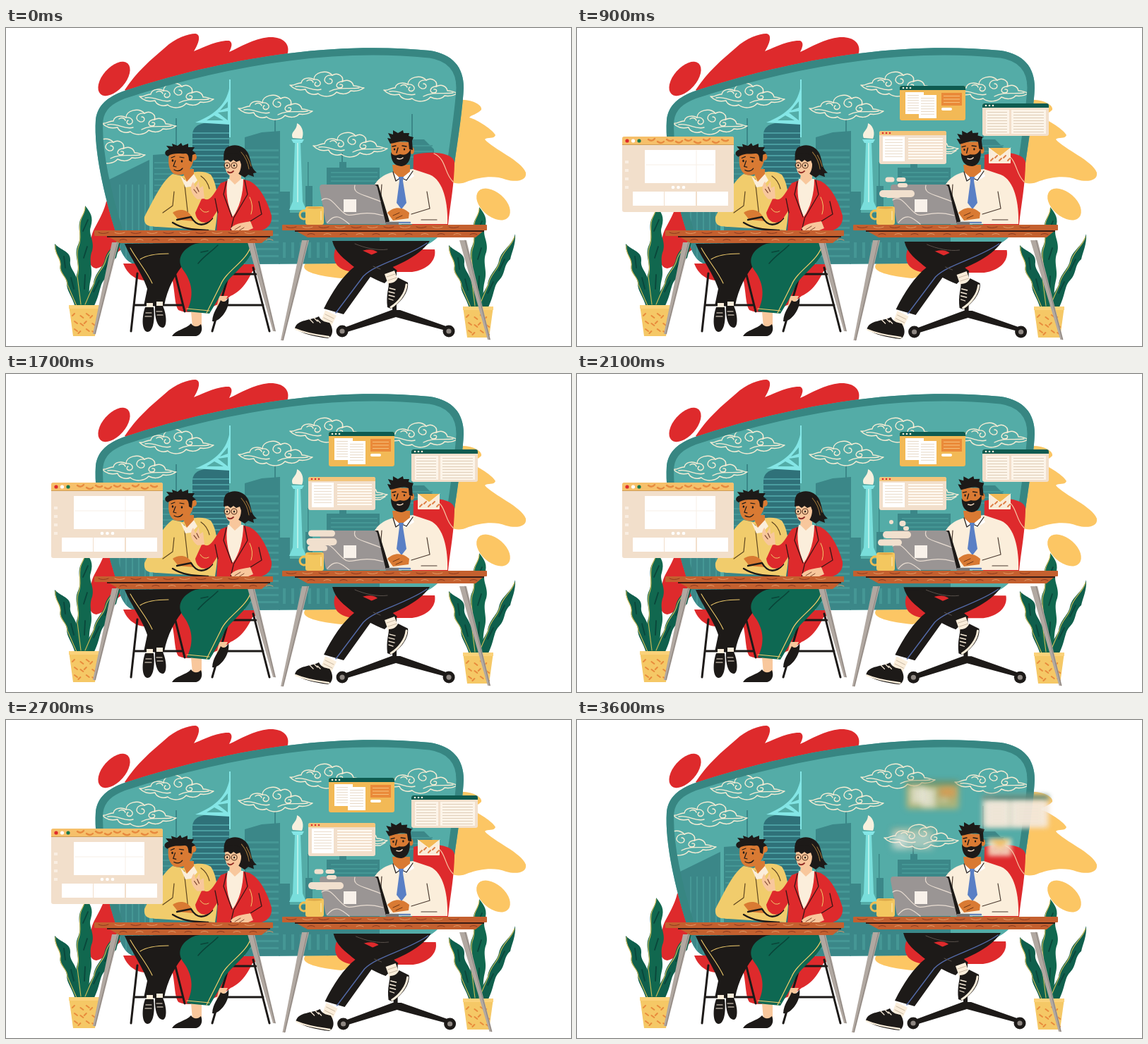
An HTML page with a canvas for the animation above (3700 ms loop, 800 by 451 pixels).

```html
<!DOCTYPE html>
<html lang="en">
<head>
<meta charset="utf-8">
<title>Team at work</title>
<style>
html, body { margin: 0; width: 100%; height: 100%; overflow: hidden; background: #fff; }
canvas { display: block; width: 800px; height: 451px; }
</style>
</head>
<body>
<canvas id="stage" width="800" height="451"></canvas>
<script>
const ctx = document.getElementById('stage').getContext('2d');
const LOOP = 3700, STEP = 100, SWAY = 1800;
const RED = '#de2a2c', YELLOW = '#fcc664', INK = '#1d1a18', CREAM = '#fbeedb', PAPER = '#f2dfcb',
      SKY = '#54aca7', RIM = '#378682', TAN = '#d97a33', PINK = '#f8c79c', GREEN = '#0e6852', GOLD = '#f1cc6c',
      WOOD = '#c4602f', STEEL = '#b1a8a1', CYAN = '#84e6e6', WHITE = '#fff';

function fill(d, c) { ctx.fillStyle = c; ctx.fill(new Path2D(d)); }
function line(d, c, w = 1.3) {
  ctx.strokeStyle = c; ctx.lineWidth = w;
  ctx.stroke(new Path2D(d));
}
function box(x, y, w, h, c, r = 0) {
  ctx.fillStyle = c; ctx.beginPath(); ctx.roundRect(x, y, w, h, r); ctx.fill();
}
function oval(x, y, rx, ry, c, a = 0) {
  ctx.fillStyle = c; ctx.beginPath(); ctx.ellipse(x, y, rx, ry, a, 0, 7); ctx.fill();
}
function stripes(x, y, w, n, gap, c, h = 1) {
  for (let i = 0; i < n; i++) box(x, y + i * gap, w, h, c);
}
function at(x, y, draw, angle = 0, s = 1) {
  ctx.save(); ctx.translate(x, y); ctx.rotate(angle); ctx.scale(s, s); draw(); ctx.restore();
}
function turn(x, y, angle, draw) {
  at(x, y, () => { ctx.translate(-x, -y); draw(); }, angle);
}

function splashes() {
  oval(153, 72, 29, 16, RED, -0.85);
  fill('M168 88C185 62 205 45 225 28C240 14 258 8 268 8C277 9 273 22 266 33C278 28 300 17 316 18C322 21 319 28 316 34C332 27 350 15 372 13C392 12 402 22 399 35L390 60L200 120Z', RED);
  fill('M142 246C136 272 119 287 121 302C113 318 116 340 128 341C146 337 152 318 168 312L200 300L170 250Z', RED);
  fill('M225 325H357C346 355 336 372 318 380C300 396 262 409 244 400C236 388 242 360 225 325Z', RED);
  fill('M646 102C662 102 675 110 673 116C668 122 657 124 656 127C668 130 690 145 693 152C691 158 682 154 678 158C690 172 730 188 736 205C738 217 722 219 708 215C690 208 670 212 655 217C645 222 636 221 630 218Z', YELLOW);
  oval(690, 250, 28, 17, YELLOW, 0.72);
  fill('M424 334C414 346 445 352 475 355L510 345V328Z', YELLOW);
}

function cloud() {
  line('M-52 1C-46 3-42-3-36-2C-35-9-25-11-18-7C-18-17 0-22 8-13C16-18 25-11 22-4C30-8 37-4 38 2C44 1 47 5 53 5C47 9 40 10 34 9C29 15 20 14 14 11C8 18-5 19-12 13C-19 16-28 13-30 7C-40 9-46 7-52 1Z', '#f5ecd4', 1.5);
  line('M-18-7c8-1 12 6 7 9c-5 2-8-3-4-5M8-13c-11-1-15 9-6 12c7 1 8-7 2-7M22-4c-8 0-11 8-4 9c6 0 6-6 1-5M-44 3C-30 0-20 11-8 7M4 10C16 3 30 7 46 5M-28-5c4-3 8-1 9 2', '#f5ecd4', 1.4);
}

function city() {
  const far = '#459795', mid = '#3b8788', dark = '#2f7179';
  fill('M146 215L203 187V336H146Z', mid);
  for (let x = 160; x < 202; x += 9) box(x, 222, 2, 110, far);
  box(240, 128, 2, 54, mid);
  fill('M208 180L262 176L278 250V336H208Z', mid);
  stripes(210, 190, 60, 12, 8, far, 2);
  line('M266 178L276 222', CYAN, 1.5);
  fill('M264 150C266 134 285 132 316 135V300H264Z', dark);
  stripes(264, 148, 52, 14, 8, '#4a9da0', 2);
  box(316, 73, 2, 82, CYAN);
  fill('M317 80C314 106 298 122 268 134L318 137Z', CYAN);
  fill('M314 104L303 117L314 113ZM300 120L314 118V131ZM295 124L284 131L308 131Z', SKY);
  box(380, 130, 2, 22, mid);
  fill('M338 155L362 148L388 146V336H338Z', mid);
  stripes(340, 172, 46, 16, 10, far, 3);
  fill('M386 336V232H402V262H424V224H434V270H448V235H458V336Z', mid);
  box(427, 190, 1.5, 36, mid);
  fill('M404 158H422L419 163H407Z', CYAN);
  fill('M409 163H417L420 246L425 258H401L406 246Z', '#79dedb');
  box(412, 163, 2, 84, '#b5f1e9');
  fill('M406 156C402 147 412 146 412 135C421 139 422 151 419 157Z', '#f7f0de');
  box(475, 177, 2, 20, mid);
  fill('M454 198H472V190H482V198H529V336H454Z', mid);
  stripes(460, 204, 66, 5, 6, far, 2);
  box(574, 122, 2, 34, mid);
  fill('M560 158H592L606 172V290H560Z', mid);
  stripes(562, 166, 42, 3, 8, far, 2);
  for (let x = 392; x < 460; x += 12) box(x, 304, 4, 22, far);
}

const EDGE = 'M154 285C140 240 124 175 127 130C130 108 145 98 165 90C250 62 330 45 400 36C470 27 540 26 600 32C632 37 648 55 648 85C646 130 632 200 626 268';
const PANE = EDGE + 'C624 290 606 306 580 314L470 334L190 336C165 336 160 310 154 285Z';
const CLOUDS = [[241, 96], [381, 113], [454, 80], [587, 87], [487, 166], [188, 134], [144, 175]];

function view() {
  ctx.save();
  ctx.clip(new Path2D(PANE));
  box(110, 20, 550, 330, SKY);
  city();
  for (const [x, y] of CLOUDS) at(x, y, cloud);
  line(EDGE, RIM, 21);
  ctx.restore();
}

function plant() {
  const rib = '#cdbb58', leaf = '#0f5f4c';
  fill('M69 306C78 316 92 316 91 330C89 342 102 348 100 362C99 374 107 380 108 396H98C94 380 86 374 86 362C86 352 74 348 77 336C78 326 68 320 69 306Z', leaf);
  fill('M163 290C164 305 158 316 156 326C146 334 150 346 140 356C132 364 134 376 124 396H108C112 380 120 372 124 362C126 346 138 340 140 328C144 312 158 308 163 290Z', leaf);
  fill('M112 252C120 262 124 268 120 282C116 292 126 302 122 316C116 330 124 342 120 356C116 372 119 382 116 396H104C104 378 96 366 100 350C106 336 96 324 101 310C108 296 102 288 104 276C106 266 113 262 112 252Z', '#11684f');
  line('M70 308C68 322 79 326 77 338C76 350 87 352 87 364L100 394M112 254C112 264 105 268 105 278C103 290 108 298 102 312C98 326 106 338 101 352L106 392M162 294C158 308 145 314 141 330C138 342 127 348 125 362L112 392', rib, 1.1);
  line('M116 272L109 288M115 310L110 326M112 350L111 370M82 324L84 340M92 354L96 370M148 326L140 342M132 358L124 374', '#0a463a', 1.8);
  fill('M89 393H132L126 437H95Z', '#f5c866');
  box(89, 393, 43, 5, '#fbd27a');
  for (let i = 0; i < 12; i++) {
    const x = 97 + (i % 4) * 8.4, y = 405 + Math.floor(i / 4) * 11 + (i % 2) * 3;
    line(`M${x} ${y}l${i % 3 ? 4 : -3} 3`, '#e88b3c', 2);
  }
}

function desk(x, y, w) {
  box(x, y, w, 8, WOOD, 1);
  fill(`M${x + 18} ${y + 8}H${x + w - 4}L${x + w - 16} ${y + 18}H${x + 36}Z`, WOOD);
  box(x + 18, y + 8, w - 22, 2, '#3a1c14');
  for (let i = 0; i < w - 40; i += 23) {
    line(`M${x + i + 6} ${y + 3}q6 3 14 0M${x + i + 36} ${y + 14}q5-3 10 0`, i % 2 ? '#e39a66' : '#8b3a20', 1);
  }
}
function leg(x, y, x2, y2) {
  fill(`M${x - 5} ${y}H${x + 5}L${x2 + 2} ${y2}H${x2 - 2}Z`, STEEL);
  line(`M${x + 3} ${y}L${x2 + 1} ${y2}`, '#7e7773', 0.8);
}

function stools() {
  fill('M166 334H205V358C185 360 172 350 166 334Z', RED);
  fill('M310 336H360C354 346 340 350 312 350Z', RED);
  line('M186 348L177 430M240 350L253 402M181 393H250M318 340L292 430M350 340L373 430M304 393H364M322 349H354', INK, 3);
}

function leftLegs() {
  fill('M168 306C176 326 195 352 200 370L195 394H224C228 370 240 348 254 332L310 304Z', INK);
  line('M176 312C186 330 200 346 207 362M190 328q12-8 40-8', GOLD, 1.1);
  box(199, 390, 9, 8, CREAM); box(213, 388, 9, 8, CREAM);
  fill('M197 396C192 410 192 430 200 431C209 431 211 412 209 396Z', INK);
  fill('M211 394H222C228 408 228 424 222 425C214 425 210 410 211 394Z', INK);
  line('M198 404h8M197 409h9M213 402h8M214 407h8', CREAM, 1.2);
  fill('M262 402H277V424H264Z', PINK);
  fill('M302 380H314L306 396H298Z', PINK);
  fill('M288 303H352C352 328 322 346 310 364C304 380 296 392 288 405L256 402C267 380 264 360 250 342C240 326 252 312 268 306Z', GREEN);
  line('M347 308C342 330 312 344 304 364L284 404M256 398L288 401', GOLD, 1.2);
  line('M300 308C290 318 282 322 272 334M286 316L276 318', '#0a4438', 1.5);
  fill('M235 437C240 428 255 427 262 419C266 425 272 424 276 420C280 430 274 437 268 437Z', INK);
  fill('M292 416C293 402 300 396 304 386C308 390 312 388 315 382C318 398 302 418 292 416Z', INK);
}

function leftMan(sway) {
  fill('M236 207C222 215 208 245 196 268C195 279 200 282 215 282L245 284L296 287C301 260 302 225 290 208C280 201 262 203 250 210Z', GOLD);
  line('M238 232L236 252L222 262M252 214L258 268M276 210q9 6 12 18', '#5d4520', 1.2);
  fill('M236 262C244 256 256 256 262 266L266 274L244 272Z', TAN);
  line('M242 272L262 268C270 282 282 282 292 270M236 276C252 286 268 286 286 287', INK, 2.4);
  fill('M248 200H266V214L257 220Z', TAN);
  fill('M247 210L256 218L266 207L271 216L262 225L254 226Z', CREAM);
  turn(255, 208, -0.025 * sway, () => {
    fill('M231 178C229 190 230 202 238 207C250 212 262 204 266 186L260 174Z', TAN);
    oval(266, 183, 4, 5, TAN);
    fill('M229 182C222 178 226 173 231 172L227 167L236 168L235 164L243 167L248 163L250 167L258 164L258 169L267 169L264 174L269 178L264 180L263 190L259 188C259 181 257 178 254 178C246 179 238 176 229 182Z', INK);
    line('M234 184l5-2M246 183l6 1M240 188L237 196L241 197M238 201q7 4 12-2', INK, 1.2);
    oval(236, 188, 1.3, 1.7, INK); oval(249, 189, 1.3, 1.7, INK);
  });
}

function woman(sway) {
  fill('M304 220C294 235 288 250 278 240L268 262C270 277 284 280 292 270L300 258L298 290H352C358 288 378 286 376 266C370 245 360 225 345 217L325 212Z', RED);
  fill('M314 214H336C336 236 330 256 321 268C314 252 310 232 314 214Z', CREAM);
  line('M312 218L308 236L320 268M338 216L342 236L322 270M296 242L300 262M358 246L362 264L346 274M322 271L318 288', '#3b1716', 1.3);
  line('M345 240q6 12 2 24M275 256q5 8 12 4', GOLD, 1);
  fill('M318 284C326 276 338 276 346 274L350 284L336 290H322Z', PINK);
  line('M324 286l8-5M329 288l8-5', '#7d4630', 1);
  turn(276, 240, 0.05 * sway, () => {
    fill('M271 243C262 236 259 226 265 218L268 226L273 217L274 227L279 224L281 242Z', PINK);
    line('M266 229l4 5M270 226l3 6', '#7d4630', 1.2);
  });
  fill('M318 204H333V214L324 222L316 214Z', PINK);
  turn(325, 210, 0.012 * sway, () => {
    fill('M312 170C322 163 337 166 343 178C348 190 346 198 355 205L350 206L351 211L343 208L338 212L331 208L312 192C306 186 308 174 312 170Z', INK);
    fill('M310 186L332 186C335 199 330 211 321 211C312 209 309 200 310 186Z', PINK);
    fill('M308 188C308 176 326 174 335 184L334 196L331 188L326 190L322 187L318 190L314 187Z', INK);
    line('M333 176q9 10 11 24M340 180q5 8 7 16', '#a37b3c', 1);
    ctx.strokeStyle = '#5c3520'; ctx.lineWidth = 1.1;
    for (const x of [313, 323]) { ctx.beginPath(); ctx.arc(x, 195, 4, 0, 7); ctx.stroke(); oval(x, 195, 1.1, 1.5, INK); }
    line('M314 204q4 3 8-1', '#8f2a24', 1.8);
  });
}

function rightLegs() {
  fill('M466 314C460 334 472 345 495 346H575C596 343 610 330 607 314Z', RED);
  line('M550 346V406', INK, 6);
  fill('M546 400H558L626 424V430L552 410L480 432L476 426Z', INK);
  for (const x of [476, 627]) { oval(x, 430, 8.5, 8.5, INK); oval(x, 430, 3.6, 3.6, '#8f8883'); }
  fill('M462 302H600C584 326 548 340 518 350L478 406L450 398C462 374 476 352 494 338C478 328 466 318 462 302Z', INK);
  fill('M500 318C510 312 522 314 526 318L512 324Z', RED);
  fill('M484 306C510 318 538 330 554 344L536 362C506 350 476 332 466 306Z', INK);
  line('M596 305C566 326 524 334 506 352L467 404', '#536aa8', 1.4);
  line('M494 306C508 312 526 316 540 314M520 338l10 4', '#58504a', 1);
  fill('M452 400L468 408L460 424L446 416Z', CREAM);
  fill('M536 349L550 344L556 360L542 366Z', CREAM);
  line('M452 406l12 6M450 411l12 6M539 353l12-4M541 358l12-4', '#c9b9a4', 1);
  fill('M409 426C412 413 432 415 443 409C447 417 454 417 458 418C465 428 462 438 456 440C438 438 420 434 409 426Z', INK);
  line('M410 427C426 434 444 436 457 438', CREAM, 2.4);
  line('M430 413l5 5M436 411l5 5M441 414l4 4', CREAM, 1.2);
  fill('M540 396C538 378 542 370 542 362C550 362 553 358 555 354L569 361C571 376 556 392 545 398Z', INK);
  line('M567 364C566 377 555 390 545 396', CREAM, 3);
  line('M543 369l8 2M542 374l8 2M542 379l8 2M542 384l6 2', CREAM, 1.3);
}

function rightMan(sway) {
  fill('M548 204C528 210 520 220 516 238L530 278H625C626 250 620 216 600 208L576 200Z', CREAM);
  line('M532 222L530 250M596 232L600 256L574 264M588 272H610', '#4a3a30', 1.2);
  fill('M547 194H572V206L560 216L549 208Z', TAN);
  fill('M548 204L559 214L574 202L578 210L566 218L559 213L552 219Z', WHITE);
  line('M548 204L552 217L559 212L567 216L576 203', '#2c2522', 1.3);
  fill('M556 211H563L562 217L567 248L560 257L553 248L557 217Z', '#597fc5');
  fill('M540 262C548 254 560 252 571 262L570 270L548 273Z', TAN);
  line('M548 266l9-4M552 270l9-4', '#6b3517', 1);
  line('M538 276H572', '#6183bb', 2.4);
  turn(560, 204, -0.05 * sway, () => {
    fill('M545 161C545 182 548 192 558 192C570 192 573 182 574 162Z', TAN);
    oval(575, 174, 3, 5, TAN);
    fill('M545 176C548 182 552 181 558 179C564 180 568 181 573 172C574 186 569 196 559 196C549 195 545 188 545 176Z', INK);
    line('M554 185q5 2 8-1', '#f3d9c0', 1.6);
    fill('M544 164L540 156L545 157L541 149L548 151L548 145L555 149L562 145L563 149L571 149L570 153L577 155L575 160L576 173L571 172L570 162C562 158 552 163 544 164Z', INK);
    line('M547 168l5-1M561 167l6 1M555 170L553 177', INK, 1.4);
    oval(550, 172, 1.2, 1.6, INK); oval(564, 172, 1.2, 1.6, INK);
  });
}

function laptop() {
  fill('M522 222H527L543 274L538 279Z', INK);
  fill('M448 222H520Q525 222 526 227L538 278H456Q453 278 452 272L444 227Q444 222 448 222Z', '#9a9594');
  line('M447 244C458 236 466 252 478 262C488 272 500 256 534 266M494 223C490 236 508 236 530 246M455 276C466 262 474 268 486 278', '#e9ddd2', 1.2);
  box(478, 243, 18, 18, '#f8f1ea');
  box(538, 275, 18, 4, '#777');
}
function mug() {
  ctx.strokeStyle = '#eebd52'; ctx.lineWidth = 3;
  ctx.beginPath(); ctx.arc(422, 265, 6, 1, 5.4); ctx.stroke();
  box(424, 253, 26, 26, '#f3c75f', 3);
  oval(437, 255, 11, 1.5, '#dfa748');
  line('M446 260v12', '#fbe2a0', 1.5);
}

// Steam poses inside one sway cycle: phase, then x, y, width, height of each puff
const STEAM = [
  [300, [445, 210, 6, 6], [461, 212, 9, 8], [466, 219, 8, 6], [453, 228, 40, 10], [443, 239, 34, 9]],
  [500, [443, 224, 0, 0], [452, 226, 0, 0], [441, 233, 33, 11], [449, 240, 38, 6], [441, 249, 30, 9]],
  [900, [443, 215, 13, 7], [459, 215, 13, 6], [461, 223, 14, 6], [453, 235, 50, 10], [448, 239, 20, 4]],
  [1700, [446, 220, 0, 0], [452, 221, 0, 0], [447, 226, 38, 9], [447, 238, 43, 10], [441, 247, 28, 8]]
];
function steam(t) {
  if (t < 200 || t > 3500) return;
  let p = t % SWAY;
  if (p < 300) p += SWAY;
  const i = STEAM.findLastIndex(s => s[0] <= p);
  const a = STEAM[i], b = STEAM[(i + 1) % 4];
  const end = i === 3 ? SWAY + 300 : b[0];
  const k = (p - a[0]) / (end - a[0]);
  ctx.globalAlpha = Math.min(1, (t - 100) / 300, (3600 - t) / 300);
  for (let n = 1; n < 6; n++) {
    const [x, y, w, h] = a[n].map((v, j) => v + (b[n][j] - v) * k);
    if (w > 1) box(x - w / 2, y - h / 2, w, h, '#f1e0ce', h / 2);
  }
  ctx.globalAlpha = 1;
}

function frame(x, y, w, h, bar, body, barH) {
  box(x, y, w, h, body, 3);
  box(x, y, w, barH, bar, [3, 3, 0, 0]);
}
function bigPanel() {
  frame(64, 154, 158, 107, '#f6c06a', PAPER, 12);
  for (let i = 0; i < 9; i++) line(`M${101 + i * 13} ${158 + (i % 2) * 3}q5 4 9 ${i % 3 - 1}`, '#e78a3f', 2.4);
  [RED, WHITE, '#1b7a4c'].forEach((c, i) => oval(71 + i * 8.5, 160, 2.6, 2.6, c));
  box(64, 165, 158, 1, '#cf9c57');
  box(96, 173, 100, 47, WHITE);
  line('M169 174V219M98 194H194', '#f7efe6', 1);
  [136, 143.5, 151].forEach(x => oval(x, 226, 2.3, 2.3, WHITE));
  [79, 124, 170].forEach(x => box(x, 232, 44, 20, WHITE));
  stripes(68, 188, 5, 4, 12, '#f9eee2', 4);
}
function dots(x, y, c) { for (let i = 0; i < 3; i++) oval(x + i * 5, y, 1.3, 1.3, c); }
function notesPanel() {
  frame(457, 82, 93, 49, '#0e5b50', '#f2b956', 6);
  dots(462, 85, CREAM);
  box(465, 91, 26, 31, WHITE); stripes(468, 95, 20, 7, 3.6, '#e6d7c4');
  box(484, 95, 25, 33, WHITE); stripes(487, 99, 19, 7, 3.8, '#e6d7c4');
  box(516, 92, 29, 18, '#ea8a39'); stripes(519, 96, 23, 3, 4.5, '#f6c27c');
  box(516, 113, 15, 4, WHITE, 2);
}
function textPanel() {
  frame(574, 107, 94, 46, '#0e5b50', PAPER, 6);
  dots(579, 110, CREAM);
  box(579, 116, 33, 34, '#fcf4e9'); box(615, 116, 49, 34, '#fcf4e9');
  stripes(581, 119, 28, 8, 4, '#dfcdb7'); stripes(618, 119, 43, 8, 4, '#dfcdb7');
}
function chatPanel() {
  frame(428, 146, 95, 47, '#f3c47a', PAPER, 6);
  dots(433, 149, RED);
  box(433, 154, 31, 35, WHITE); stripes(436, 158, 25, 7, 4, '#eadccb');
  stripes(469, 156, 49, 8, 4, '#fffaf3', 2);
  line('M523 178L530 178L537 174', CREAM, 1.3);
}
function letter() {
  box(583, 170, 31, 22, '#faecd9', 1);
  for (let i = 0; i < 5; i++) line(`M${586 + i * 6} ${188 - (i % 2) * 4}l3-3`, '#de8048', 2);
  fill('M583 170H614L599 182Z', '#f3b955');
  line('M583 170L599 182L614 170', '#fdf4e2', 1);
}

// centre, start of arrival, start of departure, drawing
const PANELS = [
  [143, 207, 100, 3050, bigPanel], [503, 107, 0, 3270, notesPanel], [621, 130, 50, 3300, textPanel],
  [475, 169, 0, 3250, chatPanel], [598, 181, 200, 3310, letter]
];
function pop(k) { return 1 + 4 * (k - 1) ** 3 + 3 * (k - 1) ** 2; }
function panels(t) {
  for (const [x, y, start, leave, draw] of PANELS) {
    const k = Math.min(1, (t - start) / 400, 1 - (t - leave) / 400);
    if (k <= 0) continue;
    const s = Math.max(0.05, pop(k));
    ctx.save();
    ctx.globalAlpha = Math.min(1, k * 3.2);
    if (k < 0.7) ctx.filter = `blur(${((0.7 - k) * 8).toFixed(1)}px)`;
    at(x, y, () => { ctx.translate(-x, -y); draw(); }, 0, s);
    ctx.restore();
  }
}

function paint(t) {
  const sway = (1 - Math.cos(t / SWAY * 2 * Math.PI)) / 2;
  ctx.fillStyle = WHITE;
  ctx.fillRect(0, 0, 800, 451);
  ctx.lineCap = ctx.lineJoin = 'round';
  splashes();
  view();
  plant();
  at(558, 2, plant);
  stools();
  leftLegs();
  leftMan(sway);
  woman(sway);
  leg(155, 304, 125, 434);
  leg(347, 304, 380, 430);
  desk(125, 287, 253);
  fill('M577 180C600 174 632 176 635 190C635 220 629 250 626 279H575Z', RED);
  line('M606 178C624 186 620 206 633 218', '#f7c9a5', 1.2);
  at(1.6 * sway, sway, rightLegs);
  leg(424, 301, 391 + 2.5 * sway, 443);
  leg(647, 301, 684 + 2.5 * sway, 442);
  rightMan(sway);
  desk(391, 279, 290);
  laptop();
  panels(t);
  steam(t);
  mug();
}

const begin = performance.now();
function tick() {
  const t = (performance.now() - begin) % LOOP;
  paint(Math.floor(t / STEP) * STEP);
  requestAnimationFrame(tick);
}
tick();
</script>
</body>
</html>
```
